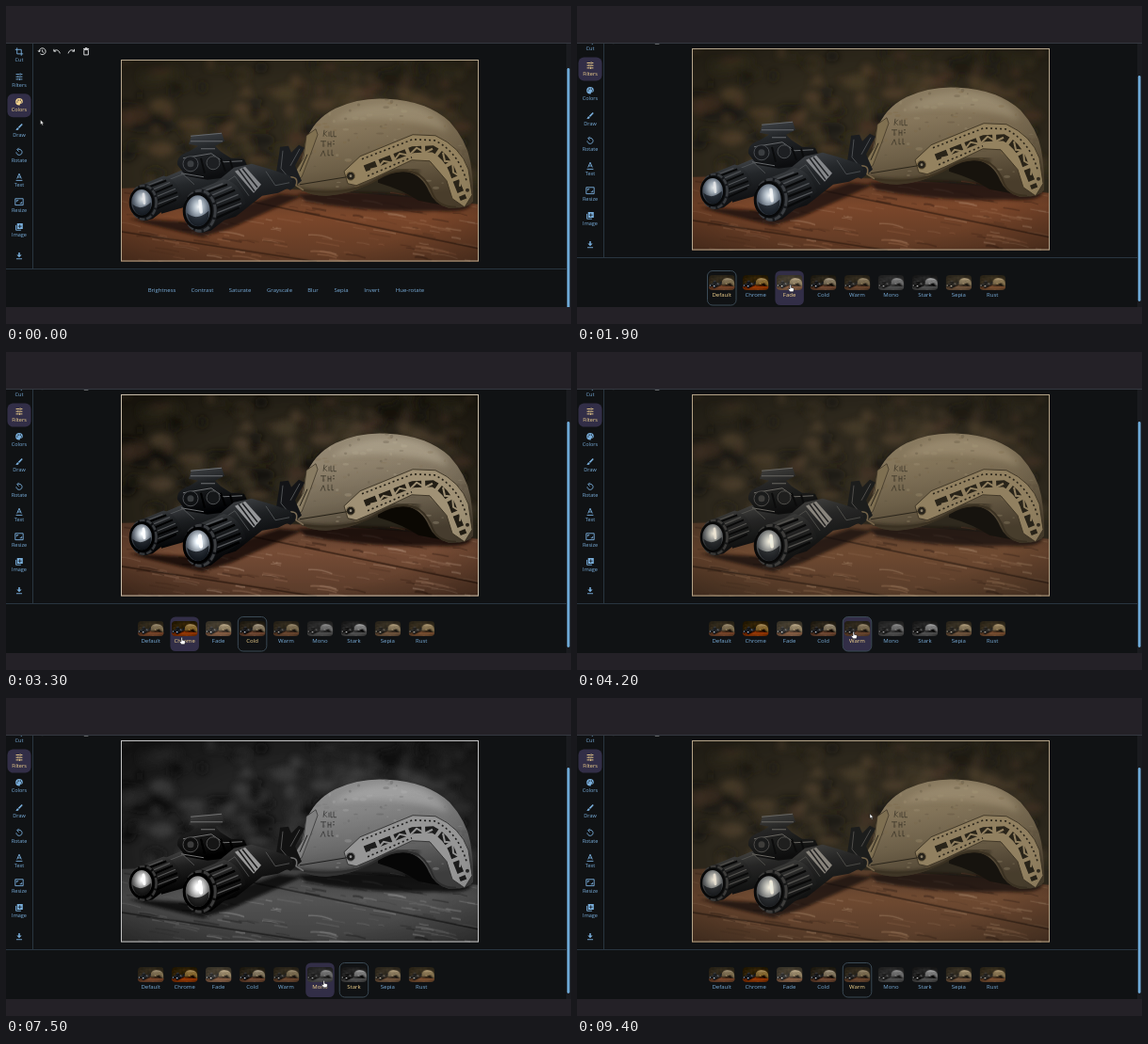
An HTML page that plays this animation: 600 by 338 pixels, repeating every 9500 ms.

```html
<!DOCTYPE html>
<html lang="en">
<head>
<meta charset="utf-8">
<title>Photo editor filters</title>
<style>
html, body { margin: 0; width: 100%; height: 100%; overflow: hidden; background: #242127; }
svg { display: block; width: 600px; height: 338px; }
text { font: 6px "Open Sans", "Noto Sans", sans-serif; text-anchor: middle; fill: #79aedb; }
.icon { fill: none; stroke: #79aedb; stroke-width: 2.4; }
.icon .solid { fill: #79aedb; stroke: none; fill-rule: evenodd; }
.pill, .box { fill: none; }
.hover .pill, .active .pill, .hover .box { fill: #322e47; }
.selected .box { stroke: #3b4a55; }
.hover text, .active text, .selected text { fill: #f4d58f; }
.hover .icon, .active .icon { stroke: #f4d58f; }
.hover .solid, .active .solid { fill: #f4d58f; }
#tools .icon { stroke: #e6e8ea; }
</style>
</head>
<body>
<svg viewBox="0 0 600 338">
  <defs>
    <filter id="soft" x="-20%" y="-20%" width="140%" height="140%"><feGaussianBlur stdDeviation="3"/></filter>
    <filter id="blur"><feGaussianBlur stdDeviation="1.8"/></filter>
    <linearGradient id="wood" x2="0" y2="1">
      <stop offset="0" stop-color="#5d3a26"/><stop offset=".4" stop-color="#7b472b"/><stop offset="1" stop-color="#5f3a25"/>
    </linearGradient>
    <linearGradient id="shell" x2=".25" y2="1">
      <stop offset="0" stop-color="#8d7f65"/><stop offset=".35" stop-color="#85755a"/>
      <stop offset=".65" stop-color="#6e6048"/><stop offset="1" stop-color="#493d2b"/>
    </linearGradient>
    <linearGradient id="tube" x2=".3" y2="1">
      <stop offset="0" stop-color="#44474b"/><stop offset=".4" stop-color="#24272a"/><stop offset="1" stop-color="#0c0d0f"/>
    </linearGradient>
    <radialGradient id="glass" cx=".52" cy=".38" r=".62">
      <stop offset="0" stop-color="#f0f4f6"/><stop offset=".25" stop-color="#b5c0ca"/>
      <stop offset=".6" stop-color="#626d7b"/><stop offset="1" stop-color="#1a2028"/>
    </radialGradient>
    <radialGradient id="vignette" cx=".52" cy=".55" r=".7">
      <stop offset=".6" stop-opacity="0"/><stop offset="1" stop-opacity=".3"/>
    </radialGradient>
    <clipPath id="round"><rect x="2" y="5" width="27.5" height="16" rx="4"/></clipPath>
    <clipPath id="stage"><rect y="39.5" width="600" height="280.5"/></clipPath>
    <path id="dome" d="M314 183Q303 174 312 160Q316 147 318 133Q326 109 350 97Q376 85 405 87
      Q447 89 471 111Q489 131 493 153Q497 176 496 196Q490 204 470 203Q455 199 449 185Q442 168 425 164
      Q408 163 390 174Q370 188 340 190Q322 190 314 183z"/>
    <clipPath id="domeClip"><use href="#dome"/></clipPath>

    <g id="barrel">
      <path fill="url(#tube)" d="M-5-18L22-29Q36-26 42-7L10 18L0 20z"/>
      <path fill="none" stroke="#505357" stroke-width="1.2" d="M0-17L21-25M8-13L29-22M13-6L35-15M15 2L38-7"/>
      <path fill="none" stroke="#08090a" stroke-width="2" d="M4-16L25-24M11-10L32-19M14-2L37-11M14 7L36-3"/>
      <ellipse rx="15" ry="20" cx="1" fill="#17191c"/>
      <ellipse rx="14" ry="18.5" fill="none" stroke="#3b3e42" stroke-width="2.5" stroke-dasharray="6 2"/>
      <ellipse rx="12.5" ry="15.5" cx="-2" fill="url(#glass)" stroke="#08090a" stroke-width="2.5"/>
      <path fill="#10161d" opacity=".75" d="M-12 2q9 8 20-2q1 13-10 14q-8-1-10-12"/>
      <path stroke="#fff" stroke-width="3" opacity=".75" stroke-linecap="round" d="M0-9l1 10"/>
    </g>

    <symbol id="scene" viewBox="122 45 380 215" preserveAspectRatio="xMidYMid slice">
      <path fill="#302a1d" d="M122 45h380v215H122z"/>
      <g id="foliage" filter="url(#soft)"/>
      <path fill="url(#wood)" d="M122 182Q300 176 502 199V260H122z"/>
      <g id="grain" fill="none"/>
      <path d="M122 228L330 260M260 196L502 246" stroke="#2b190f" stroke-width="1.3" opacity=".7" fill="none"/>
      <g filter="url(#blur)" opacity=".75">
        <path fill="#160d08" d="M310 188Q380 183 435 190L495 198Q492 209 455 206Q380 208 318 196z"/>
        <path fill="#120b07" d="M130 214L200 218L290 188L315 190L240 224L208 234L150 220z"/>
      </g>

      <path fill="#17130d" d="M395 165L440 150L486 190L480 203L438 195Q422 184 395 176z"/>
      <use href="#dome" fill="url(#shell)"/>
      <g clip-path="url(#domeClip)">
        <path fill="#b0a488" opacity=".4" filter="url(#soft)" d="M345 112Q380 84 440 95Q464 106 470 122Q420 102 345 112z"/>
        <path fill="none" stroke="#2f2619" stroke-width="9" opacity=".55" filter="url(#blur)" d="M310 185Q370 194 395 174Q420 158 438 167"/>
        <g id="wear"/>
      </g>
      <path fill="none" stroke="#3c3120" stroke-width="2" d="M314 184Q365 191 395 172Q418 158 438 167Q449 175 454 190Q460 202 478 202"/>
      <path fill="#94825f" stroke="#3e3422" stroke-width=".9" d="M359 164L376 148L432 125L456 126Q483 138 491 162L495 189
        L487 202L474 193L468 174L450 153L431 152L391 171L372 179L363 177z"/>
      <g fill="none" stroke="#2a2418">
        <path stroke-width="7" stroke-dasharray="13 4" d="M381 161L432 141L453 140Q470 149 476 169L486 194"/>
        <path stroke-width="1.6" stroke-dasharray="2 3" d="M378 151L432 130L455 131Q480 143 489 174M384 169L431 149"/>
      </g>
      <path fill="none" stroke="#94825f" stroke-width="2" d="M387 162l8-2 6-7 9 2 8-10 10 2 8-8 9 5 8-4M464 144l2 9 8 1 1 11 8 5-1 10"/>
      <circle cx="366" cy="169" r="4.5" fill="#27231b" stroke="#756443"/><circle cx="366" cy="169" r="1.4" fill="#8c826c"/>
      <circle cx="490" cy="184" r="2" fill="#342c1e"/>
      <path fill="none" stroke="#332e21" stroke-width=".8" opacity=".85" d="M338 120l-1 7m4-6-3 3 3 3m2-5v5m2-6v6h2m1-6v6h3
        M334 132h6m-3 0v6m5-6v6m0-3h3m0-3v6m2-6h2m-2 3h2M334 148l3-6 2 6m3-7v6h2m2-6v6h2"/>
      <path fill="#807050" stroke="#3b3221" stroke-width=".7" d="M319 126L329 119L331 125L323 147L314 170L307 174L306 166L316 150z"/>
      <path fill="none" stroke="#2b2519" d="M312 178L362 170M320 146L312 164"/>

      <path fill="#1b1d20" d="M287 165L290 146L291 138L300 137L303 144L311 136L317 139L307 158L314 174L302 184L291 178z"/>
      <path fill="none" stroke="#4c4f52" d="M294 142L292 161L303 174M312 140L302 158"/>
      <path fill="none" stroke="#756347" stroke-width="1.6" d="M302 170q9 0 6 9l8 5"/>
      <path fill="url(#tube)" d="M160 174L186 163L222 166L240 180L197 200L165 209z"/>
      <path fill="url(#tube)" d="M182 157Q181 147 194 143L204 137L194 135L197 126L229 123L232 132L222 137L228 143
        L239 150L253 151L257 160L247 169L214 173L191 169z"/>
      <path fill="none" stroke="#66696c" d="M196 126.5l33-3M196 132h34M188 150l30-5 13 9 20-1M207 140h15M186 166l24 4"/>
      <circle cx="196" cy="156" r="8" fill="#191b1e" stroke="#4a4d51"/><circle cx="196" cy="156" r="3.5" fill="#3b3e41"/>
      <circle cx="220" cy="155" r="7" fill="#1d1f22" stroke="#4c4f52"/>
      <path fill="none" stroke="#0a0b0c" stroke-width="2" d="M228 150l5 14M238 152l4 14M207 150l4 16"/>
      <path fill="url(#tube)" d="M220 178L242 160L261 156L282 162L302 169L305 179L289 187L272 190L244 212L228 217z"/>
      <path fill="#85878a" d="M243 164L254 159L271 178L263 187z"/>
      <path fill="none" stroke="#222427" stroke-width="1.5" d="M247 162l17 23M251 161l16 20"/>
      <path fill="none" stroke="#54575a" stroke-width=".8" d="M231 177L243 169L258 190M276 164l10 15 15-3M170 174l18-7 12 11"/>
      <use href="#barrel" transform="translate(146 197) scale(.97)"/>
      <use href="#barrel" transform="translate(206 206) scale(1.16)"/>
      <path fill="url(#vignette)" d="M122 45h380v215H122z"/>
    </symbol>
  </defs>

  <path fill="#242127" d="M0 0h600v338H0z"/>
  <g clip-path="url(#stage)">
    <path fill="#101214" d="M0 39h600v281H0z"/>
    <path fill="#1a1b1f" d="M595 39h5v281h-5z"/>
    <g id="content">
      <path d="M28.5 30V279.5M0 279.5H595" stroke="#293540" fill="none"/>
      <g id="tools"></g>
      <g id="sidebar"></g>
      <g id="photo">
        <use href="#scene" x="122" y="57" width="380" height="214.5"/>
        <rect x="122.5" y="57.5" width="379" height="213.5" fill="none" stroke="#b5a58c"/>
      </g>
    </g>
    <g id="adjustments"></g>
    <g id="filters"></g>
    <rect id="scrollbar" x="595.8" width="2.8" rx="1.4" fill="#6eaad8"/>
  </g>
  <path d="M0 39.5H600" stroke="#343840"/>
  <g id="cursor" stroke-linejoin="round">
    <path id="arrow" fill="#fff" stroke="#111" stroke-width=".5" d="M0 0v5l1.2-1 .9 1.9.9-.4-.8-1.8h1.6z"/>
    <path id="hand" fill="#fff" stroke="#15151a" stroke-width=".6" d="M-1-3.5q.8-.7 1.5 0v2.8l2.4.6q.8.3.6 1.2L2.8 3.8h-3.6L-2.9.9q0-1 .9-.7l1 .7z"/>
  </g>
</svg>
<script>
const $ = id => document.getElementById(id);
const add = (id, html) => $(id).insertAdjacentHTML('beforeend', html);
const DURATION = 9500, SCROLL = 12, TAB_TIME = 700;

let seed = 11;
const random = (min, max) => {
  seed = seed * 16807 % 2147483647;
  return min + seed / 2147483647 * (max - min);
};
const pick = list => list[Math.floor(random(0, list.length))];
const blob = (id, x, y, rx, ry, fill, opacity) =>
  add(id, `<ellipse cx="${x}" cy="${y}" rx="${rx}" ry="${ry}" fill="${fill}" opacity="${opacity}"/>`);

for (let i = 0; i < 190; i++) {
  blob('foliage', random(122, 502), random(45, 175), random(3, 15), random(2, 9),
    pick(['#15140e', '#211d14', '#4a3c27', '#5a462e', '#39331f', '#52392a']), .6);
}
for (let i = 0; i < 170; i++) {
  const x = random(115, 490), y = random(186, 260), length = random(5, 30);
  add('grain', `<path d="M${x} ${y}q${length / 2} ${random(-1, 2)} ${length} ${length * .17}"
    stroke="${pick(['#3b2115', '#9a6a4b', '#a98266', '#5a3521', '#8b5a3e'])}" stroke-width="${random(.5, 2)}" opacity=".5"/>`);
}
for (let i = 0; i < 120; i++) {
  blob('wear', random(312, 495), random(86, 190), random(.5, 4), random(.4, 2), pick(['#a29679', '#5b4e38', '#7d6644']), .3);
}

const icon = (x, y, d, solid = '', size = .38) =>
  `<g class="icon" transform="translate(${x} ${y}) scale(${size}) translate(-12 -12)">
    <path d="${d}"/><path class="solid" d="${solid}"/></g>`;

[
  ['M4 12a9 9 0 1 1 3 6M1 9l3 4 4-4M13 7v5l4 3'],
  ['M4 5v6h6M4 11c6-6 14-4 17 6'],
  ['M20 5v6h-6M20 11c-6-6-14-4-17 6'],
  ['M6 7h12v14H6zM4 4h16M9 2h6']
].forEach(([d], i) => add('tools', icon(38.3 + 15.6 * i, 48.5, d)));

const tabs = [
  ['Cut', 'M6 1v17h17M1 6h17v17'],
  ['Filters', 'M3 5h10M17 5h4M15 2v6M3 12h4M11 12h10M9 9v6M3 19h8M15 19h6M13 16v6'],
  ['Colors', '', 'M12 2a10 10 0 1 0 0 20c4 0 1-4 3-5s7 1 7-6-5-9-10-9zM5 11h3v3H5zM8 6h3v3H8zM14 6h3v3h-3zM17 11h3v3h-3z'],
  ['Draw', '', 'M19 3l3 3-10 10-3-3zM8 14l3 3c0 5-6 5-9 3 3-1 2-5 6-6z'],
  ['Rotate', 'M8 6a8 8 0 1 1-4 7M11 1L6 6l5 5'],
  ['Text', 'M6 17L12 3l6 14M8 13h8M3 22h18'],
  ['Resize', 'M1 3h22v18H1zM5 12V8h5M19 12v4h-5'],
  ['Image', 'M3 7v14h14', 'M6 2h16v16H6zM13 5v4H9v2h4v4h2v-4h4V9h-4V5z'],
  ['', 'M4 21h16', 'M10 3h4v7h5l-7 7-7-7h5z']
];
tabs.forEach(([name, d, solid], i) => add('sidebar', `<g transform="translate(0 ${26.6 * i})">
  <rect class="pill" x="1.5" y="40" width="25" height="25" rx="6"/>
  ${icon(14, name ? 48.6 : 52.5, d, solid)}<text x="14" y="59.3" style="font-size:5.5px">${name}</text></g>`));

[['Brightness', 165.5], ['Contrast', 208.5], ['Saturate', 248.5], ['Grayscale', 290.5], ['Blur', 326],
  ['Sepia', 356], ['Invert', 388.5], ['Hue-rotate', 429]
].forEach(([name, x]) => add('adjustments', `<text x="${x}" y="304">${name}</text>`));

const filters = [
  ['Default', 'none'],
  ['Chrome', 'saturate(1.7) contrast(1.1)'],
  ['Fade', 'sepia(.3) contrast(.9) brightness(1.15)'],
  ['Cold', 'saturate(.65) brightness(1.1) contrast(1.12)'],
  ['Warm', 'sepia(.3) brightness(.93)'],
  ['Mono', 'grayscale(1)'],
  ['Stark', 'grayscale(1) brightness(1.12) contrast(1.15)'],
  ['Sepia', 'sepia(.6)'],
  ['Rust', 'sepia(.4) saturate(1.2)']
];
const TILE_X = 138, TILE_STEP = 35.95;
filters.forEach(([name, css], i) => add('filters', `<g transform="translate(${TILE_X + TILE_STEP * i} 281)">
  <rect class="box" x=".5" y=".5" width="30.5" height="36.5" rx="5.5"/>
  <g clip-path="url(#round)"><g style="filter:${css}"><use href="#scene" x="2" y="5" width="27.5" height="16"/></g></g>
  <text x="15.7" y="28">${name}</text></g>`));

// [time, x, y]
const path = [
  [0, 36.5, 121], [200, 36.5, 121], [600, 16, 77], [950, 16, 77], [1550, 160, 270], [1900, 227, 300], [2150, 227, 300],
  [2600, 262, 302], [2850, 262, 302], [3300, 187, 307], [3550, 187, 307], [4000, 294, 301], [4800, 294, 301],
  [5150, 333, 303], [5400, 333, 303], [5800, 362, 302], [6300, 362, 302], [6700, 371, 304], [7050, 371, 304],
  [7500, 338, 304], [7900, 338, 304], [8400, 297, 303], [8750, 297, 303], [9400, 311, 123], [9500, 311, 123]
];
// [time, filter]
const clicks = [[0, 0], [2050, 2], [2700, 3], [3450, 1], [4050, 4], [5200, 5], [6150, 6], [8500, 4]];

const cursorAt = t => {
  const i = path.findIndex(p => p[0] > t);
  const [t0, x0, y0] = path[i - 1], [t1, x1, y1] = path[i];
  const u = (t - t0) / (t1 - t0), e = u * u * (3 - 2 * u);
  return [x0 + (x1 - x0) * e, y0 + (y1 - y0) * e];
};
const show = (id, on) => $(id).style.display = on ? '' : 'none';
const mark = (id, states) => [...$(id).children].forEach((el, i) => {
  for (const name in states) el.classList.toggle(name, i === states[name]);
});

let shown = -1;
function draw(now) {
  const t = now % DURATION;
  const [x, y] = cursorAt(t);
  const onFilters = t >= TAB_TIME, scroll = onFilters ? SCROLL : 0;
  const selected = clicks.findLast(c => c[0] <= t)[1];
  const column = (x - TILE_X) / TILE_STEP;
  const tile = onFilters && y > 281 && y < 318 && column % 1 < .87 ? Math.floor(column) : -1;
  const tab = x < 27 ? Math.floor((y + scroll - 40) / 26.6) : -1;

  $('content').setAttribute('transform', `translate(0 ${-scroll})`);
  show('adjustments', !onFilters);
  show('filters', onFilters);
  mark('sidebar', { active: onFilters ? 1 : 2, hover: tab });
  mark('filters', { selected, hover: tile });
  if (selected !== shown) $('photo').style.filter = filters[shown = selected][1];
  $('scrollbar').setAttribute('y', onFilters ? 74 : 66);
  $('scrollbar').setAttribute('height', onFilters ? 240 : 256);

  const pointing = tile >= 0 || tab >= 0;
  show('hand', pointing);
  show('arrow', !pointing);
  $('cursor').setAttribute('transform', `translate(${x} ${y})`);
  requestAnimationFrame(() => draw(performance.now()));
}
draw(performance.now());
</script>
</body>
</html>
```
